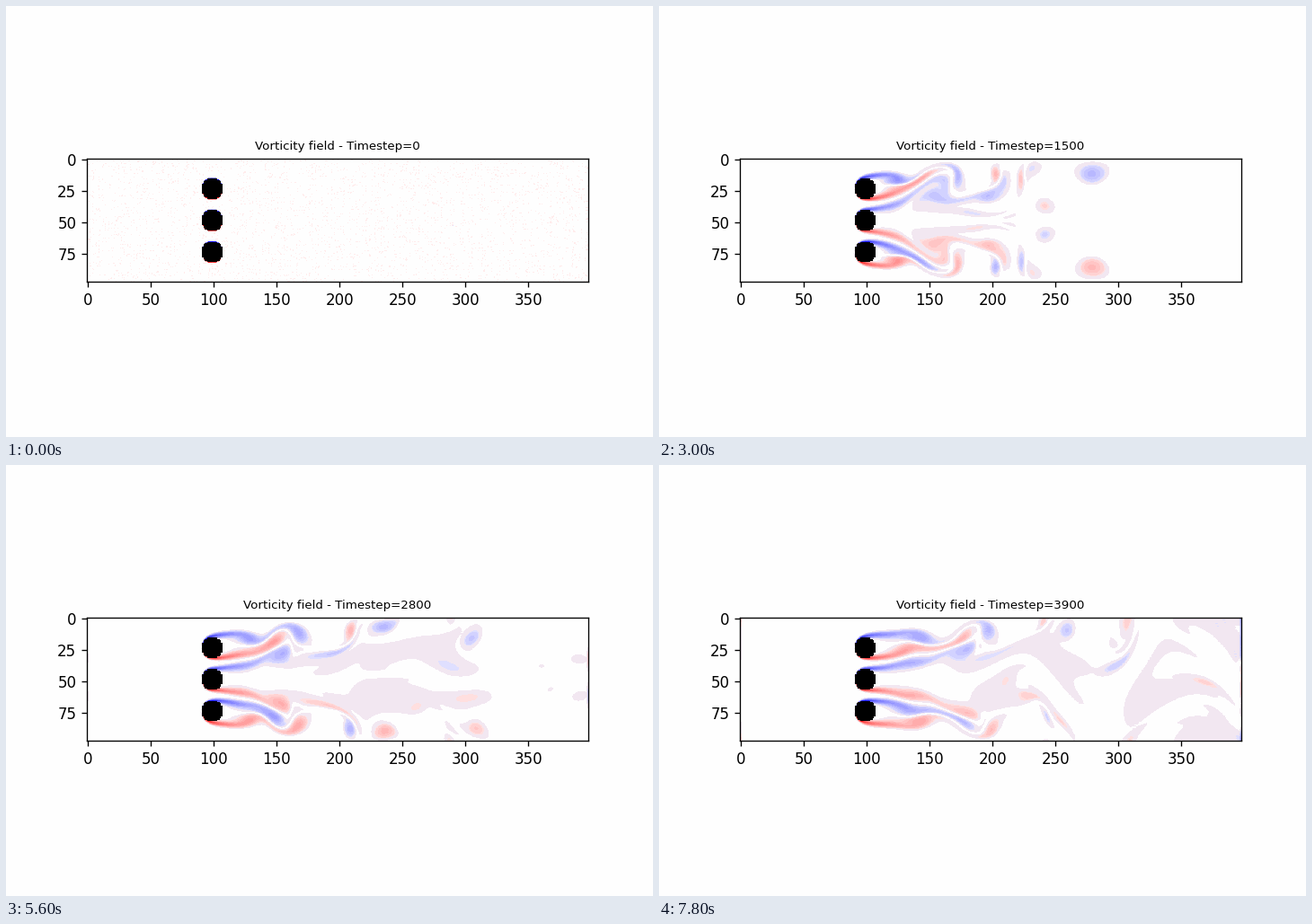
Recreate the animation shown at these times as a matplotlib script. Size 720 px wide and 480 px high, loop 8000 ms.

```python
import numpy as np
import matplotlib.pyplot as plt
from matplotlib.animation import FuncAnimation
from matplotlib.colors import ListedColormap

# Lattice Boltzmann (D2Q9) flow past three cylinders
NX, NY = 400, 100
FRAMES, STRIDE = 40, 100
OMEGA = 1 / 0.53
CX = (0, 0, 1, 1, 1, 0, -1, -1, -1)
CY = (0, 1, 1, 0, -1, -1, -1, 0, 1)
OPPOSITE = [0, 5, 6, 7, 8, 1, 2, 3, 4]
CELLS = NX * NY
PAPER = (254 / 255,) * 3

rows, cols = np.mgrid[:NY, :NX]
cylinder = np.zeros((NY, NX), bool)
for cy in (NY // 4, NY // 2, 3 * NY // 4):
    cylinder |= np.hypot(cols - NX // 4, rows - cy) < 8
solid = np.flatnonzero(cylinder)


def stream(f, out):
    """Open the left and right edges, then shift each population one cell."""
    grid, moved = f.reshape(9, NY, NX), out.reshape(9, NY, NX)
    grid[6:9, :, -1] = grid[6:9, :, -2]
    grid[2:5, :, 0] = grid[2:5, :, 1]
    for i, (cx, cy) in enumerate(zip(CX, CY)):
        s = (cx + cy * NX) % CELLS
        out[i, s:] = f[i, :CELLS - s]
        out[i, :s] = f[i, CELLS - s:]
        if cx > 0:
            moved[i, :, 0] = np.roll(grid[i, :, -1], cy)
        elif cx < 0:
            moved[i, :, -1] = np.roll(grid[i, :, 0], cy)


def collide(f):
    rho = f.sum(0)
    u = (f[2] + f[3] + f[4] - f[6] - f[7] - f[8]) / rho
    v = (f[1] + f[2] + f[8] - f[4] - f[5] - f[6]) / rho
    f[:, solid] = f[:, solid][OPPOSITE]
    u[solid] = 0
    v[solid] = 0

    rho *= OMEGA
    base = 1 - 1.5 * (u * u + v * v)
    f *= 1 - OMEGA
    f[0] += rho * base * (4 / 9)
    pairs = ((1 / 9, 1, v), (1 / 36, 2, u + v), (1 / 9, 3, u), (1 / 36, 4, u - v))
    for w, i, cu in pairs:
        weight = rho * w
        even = cu * cu
        even *= 4.5
        even += base
        even *= weight
        weight *= 3
        weight *= cu
        f[i] += even
        f[i] += weight
        f[i + 4] += even
        f[i + 4] -= weight
    return u.reshape(NY, NX), v.reshape(NY, NX)


def simulate():
    np.random.seed(42)
    start = np.ones((NY, NX, 9)) + 0.01 * np.random.randn(NY, NX, 9)
    start[:, :, 3] = 2.3
    f = np.ascontiguousarray(start.transpose(2, 0, 1).reshape(9, CELLS))
    g = np.empty_like(f)
    fields = []
    for step in range((FRAMES - 1) * STRIDE + 1):
        stream(f, g)
        u, v = collide(g)
        f, g = g, f
        if step % STRIDE == 0:
            curl = u[2:, 1:-1] - u[:-2, 1:-1] - v[1:-1, 2:] + v[1:-1, :-2]
            fields.append(np.ma.array(curl, mask=cylinder[1:-1, 1:-1]))
    return fields


def banded(edge, pale, top=0.13, band=0.05):
    """Blue-white-red map in flat bands, with one shared pale tone near zero."""
    t = np.linspace(-1, 1, 1024)
    a = np.abs(t)
    fade = 1 - np.clip((np.floor(a / band) + 0.5) * band, 0, 1)
    fade[a > 0.95] = 0
    one = np.ones_like(t)
    rgb = np.stack([np.where(t > 0, one, fade), fade, np.where(t < 0, one, fade)], axis=1)
    rgb[a < top] = pale
    rgb[a < edge] = PAPER
    cmap = ListedColormap(rgb)
    cmap.set_bad("black")
    return cmap


noise_map = banded(0.05, (1, 0.926, 0.926))
flow_map = banded(0.058, (0.951, 0.908, 0.949))
fields = simulate()

fig, ax = plt.subplots(figsize=(6, 4), dpi=120, facecolor=PAPER)
fig.subplots_adjust(left=0.125, right=0.9, bottom=0.125, top=0.88)
ax.set_facecolor(PAPER)
image = ax.imshow(fields[0], cmap=noise_map)
title = ax.set_title("", fontsize=8)


def draw(k):
    image.set_data(fields[k])
    image.autoscale()
    image.set_cmap(flow_map if k else noise_map)
    title.set_text(f"Vorticity field - Timestep={k * STRIDE}")
    return image, title


anim = FuncAnimation(fig, draw, frames=FRAMES, init_func=lambda: draw(0),
                     interval=200, repeat=True)
plt.show()
```
